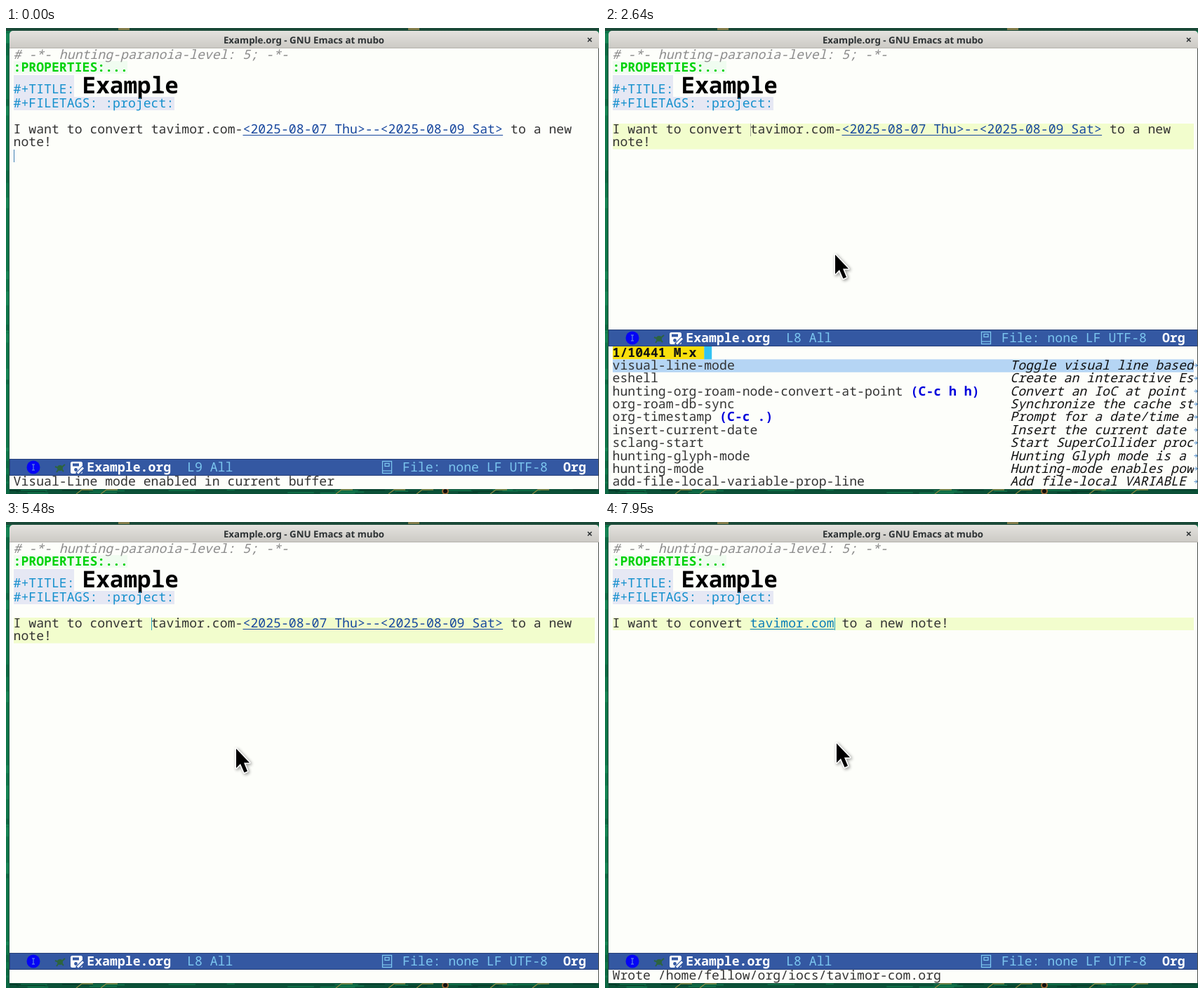
An HTML page with a canvas that plays this animation: 845x663 px, repeating every 7990 ms.

```html
<!DOCTYPE html>
<html lang="en">
<head>
<meta charset="utf-8">
<title>Editor session</title>
<style>
html, body { margin: 0; width: 100%; height: 100%; overflow: hidden; background: #0f6c45; }
canvas { display: block; }
</style>
</head>
<body>
<canvas id="stage" width="845" height="663"></canvas>
<script>
const ctx = document.getElementById('stage').getContext('2d');
const LOOP = 7990, W = 845, H = 663;
const COL = 10.9, ROW = 18.37, LEFT = 10.5, EDGE = 839;
const MONO = '"Noto Sans Mono", "DejaVu Sans Mono", monospace';
const PAPER = '#fdfefa', INK = '#333333', SKY = '#7cc6ef';
const DOMAIN = 'tavimor.com';

const commands = [
  ['visual-line-mode', '', 'Toggle visual line based'],
  ['eshell', '', 'Create an interactive Es'],
  ['hunting-org-roam-node-convert-at-point', '(C-c h h)', 'Convert an IoC at point'],
  ['org-roam-db-sync', '', 'Synchronize the cache st'],
  ['org-timestamp', '(C-c .)', 'Prompt for a date/time a'],
  ['insert-current-date', '', 'Insert the current date'],
  ['sclang-start', '', 'Start SuperCollider proc'],
  ['hunting-glyph-mode', '', 'Hunting Glyph mode is a'],
  ['hunting-mode', '', 'Hunting-mode enables pow'],
  ['add-file-local-variable-prop-line', '', 'Add file-local VARIABLE']
];

// Pointer keys: time, x, y
const path = [
  [460, 560, 668], [1250, 224, 190], [1390, 211, 158], [1530, 209, 148],
  [1650, 209, 148], [2050, 328, 322.5], [7660, 328, 322.5], [7950, 330, 315]
];

const colX = n => LEFT + n * COL;

function rect(x, y, w, h, color) {
  ctx.fillStyle = color;
  ctx.fillRect(x, y, w, h);
}

function text(str, x, y, color = INK, style = '', size = 18.17) {
  ctx.font = `${style} ${size}px ${MONO}`;
  ctx.fillStyle = color;
  ctx.fillText(str, x, y);
}

function line(points, color, width = 1) {
  ctx.strokeStyle = color;
  ctx.lineWidth = width;
  ctx.beginPath();
  points.forEach(([x, y]) => ctx.lineTo(x, y));
  ctx.stroke();
}

function disc(x, y, r, color) {
  ctx.fillStyle = color;
  ctx.beginPath();
  ctx.arc(x, y, r, 0, Math.PI * 2);
  ctx.fill();
}

function seeded(seed) {
  return () => (seed = (seed * 16807) % 2147483647) / 2147483647;
}

function drawDesktop() {
  rect(0, 0, W, H, '#0e7549');
  rect(0, 0, W, 4, '#1b4a38');
  rect(0, 656, W, 7, '#0b5037');
  const rnd = seeded(77);
  for (let i = 0; i < 26; i++) {
    const x = rnd() * W, len = 10 + rnd() * 40;
    rect(x, 656 + rnd() * 5, len, 1.5, i % 3 ? '#12764c' : '#073c2a');
    rect(0, rnd() * H, 5, 4 + rnd() * 14, i % 2 ? '#0b6742' : '#158353');
  }
  for (const x of [100, 135, 470, 545, 585, 690, 750]) {
    line([[x, 663], [x + 8, 657], [x + 24, 657]], '#8b8a45', 1.3);
  }
  for (const x of [160, 573]) rect(x, 0, 16, 3, '#857f4e');
  disc(626, 659, 5, '#9a6a35');
  disc(626, 659, 3, '#111');
}

function drawTitle(name) {
  const shade = ctx.createLinearGradient(0, 4, 0, 29);
  shade.addColorStop(0, '#e4e2de');
  shade.addColorStop(1, '#cbc9c4');
  ctx.fillStyle = shade;
  ctx.beginPath();
  ctx.roundRect(5, 4, 840, 25, [5, 5, 0, 0]);
  ctx.fill();
  rect(5, 28, 840, 1, '#b4b2ad');
  ctx.font = '600 13.3px "Noto Sans", "Open Sans", sans-serif';
  ctx.fillStyle = '#2d3234';
  ctx.textAlign = 'center';
  ctx.fillText(name + ' - GNU Emacs at mubo', 424.5, 21.5);
  ctx.textAlign = 'left';
  line([[829, 14], [834.5, 19.5]], '#2d3234', 1.6);
  line([[834.5, 14], [829, 19.5]], '#2d3234', 1.6);
}

function drawHeader() {
  rect(11, 47, 162, 18, '#f0fcf0');
  rect(11, 67, 86, 31, '#e6e8f4');
  rect(11, 98, 229, 19, '#e6e8f4');
  text('# -*- hunting-paranoia-level: 5; -*-', LEFT, 43.5, '#8c8c8c', 'italic');
  text(':PROPERTIES:...', LEFT, 62, '#00d20a', 'bold');
  text('#+TITLE:', LEFT, 92.5, '#1590cd');
  text('Example', colX(9), 93, '#000', 'bold', 32.7);
  text('#+FILETAGS: :project:', LEFT, 113, '#1590cd');
}

function linked(str, col, color) {
  text(str, colX(col), 150, color);
  rect(colX(col), 152, str.length * COL, 1, color);
}

function drawBody(mode, marked) {
  if (marked) rect(11, 136, 828, mode === 'dated' ? 36.5 : 18, '#f2fdcd');
  text('I want to convert', LEFT, 150);
  if (mode === 'dated') {
    text(DOMAIN + '-', colX(18), 150);
    linked('<2025-08-07 Thu>--<2025-08-09 Sat>', 30, '#17479e');
    text('to a new', colX(65), 150);
    text('note!', LEFT, 168.4);
  } else if (mode === 'gap') {
    text('to a new note!', colX(19), 150);
  } else {
    linked(DOMAIN, 18, '#0a7cb8');
    text('to a new note!', colX(30), 150);
  }
}

function drawModeline(y, row) {
  rect(5, y, 840, 24, '#3458a2');
  ctx.strokeStyle = '#263f78';
  ctx.lineWidth = 1;
  ctx.strokeRect(5.5, y + .5, 839, 23);
  const base = y + 18, mid = y + 12;

  disc(39, mid, 9.5, '#0505f5');
  line([[37, mid - 4], [41, mid - 4]], '#6f9ce0');
  line([[39, mid - 4], [39, mid + 4]], '#6f9ce0');
  line([[37, mid + 4], [41, mid + 4]], '#6f9ce0');

  disc(77, mid + 1, 4, '#2d6440');
  line([[70, mid - 1], [77, mid + 2], [84, mid - 4]], '#2d6440', 2);
  line([[72, mid + 7], [77, mid], [82, mid + 6]], '#2d6440', 2);

  // Disk with pencil
  ctx.fillStyle = '#fff';
  ctx.beginPath();
  ctx.roundRect(92, y + 4, 17, 17, 2.5);
  ctx.fill();
  rect(95, y + 6.5, 9, 4, '#3458a2');
  disc(99.5, y + 15.5, 2.4, '#3458a2');
  line([[101, y + 22], [111, y + 12]], '#3458a2', 6);
  line([[102, y + 20.5], [110, y + 12.5]], '#fff', 3);

  // Notebook
  ctx.strokeStyle = SKY;
  ctx.lineWidth = 1.3;
  ctx.strokeRect(536.5, y + 3.5, 13, 17);
  ctx.strokeRect(540, y + 6.5, 6, 4);
  line([[537, y + 17], [549, y + 17]], SKY, 1.2);

  text('Example.org', 115.3, base, '#fff', 'bold');
  text(`L${row} All`, 258, base, SKY);
  text('File: none LF UTF-8', 565, base, SKY);
  text('Org', 793.9, base, '#fff', 'bold');
}

function drawPicker(pick, cursorCol) {
  rect(11, 453, 130.5, 18.4, '#f9df0c');
  rect(11, 471.4 + pick * ROW, 828, ROW, '#b5d5f4');
  text(pick + 1 + '/10441 M-x', LEFT, 467.5, '#111', 'bold');
  if (cursorCol >= 0) {
    rect(colX(cursorCol), 453, COL, 18.4, '#34c3f1');
    if (cursorCol === 0) text(pick + 1, LEFT, 467.5, '#e8e36a', 'bold');
  }
  commands.forEach(([name, keys, note], i) => {
    const y = 486 + i * ROW;
    text(name, LEFT, y);
    text(keys, colX(name.length + 1), y, '#0000dc', 'bold');
    ctx.save();
    ctx.beginPath();
    ctx.rect(5, y - 16, EDGE - 5, 22);
    ctx.clip();
    text(note, colX(52), y, '#111', 'italic');
    ctx.restore();
    line([[839.5, y - 6], [844, y - 6]], '#3b7fc4');
    line([[841.5, y - 8.5], [844, y - 6], [841.5, y - 3.5]], '#3b7fc4');
  });
}

function drawPointer(t) {
  if (t < path[0][0]) return;
  let [, x, y] = path[path.length - 1];
  for (let i = 1; i < path.length; i++) {
    const [t0, x0, y0] = path[i - 1], [t1, x1, y1] = path[i];
    if (t < t1) {
      let k = (t - t0) / (t1 - t0);
      k = k * k * (3 - 2 * k);
      x = x0 + (x1 - x0) * k;
      y = y0 + (y1 - y0) * k;
      break;
    }
  }
  ctx.save();
  ctx.translate(x, y);
  const arrow = new Path2D('M0 0V27.5L6 21.5L11.5 34L16 32L11 20H19Z');
  ctx.lineJoin = 'round';
  ctx.shadowColor = 'rgba(0,0,0,.45)';
  ctx.shadowBlur = 4;
  ctx.shadowOffsetX = ctx.shadowOffsetY = 1.5;
  ctx.strokeStyle = '#fff';
  ctx.lineWidth = 3.2;
  ctx.stroke(arrow);
  ctx.shadowColor = 'transparent';
  ctx.fillStyle = '#000';
  ctx.fill(arrow);
  ctx.restore();
}

function echoAt(t) {
  if (t < 1550) return 'Visual-Line mode enabled in current buffer';
  if (t >= 5810 && t < 6530) return 'Waiting for reply from selection owner...';
  if (t >= 6830) return `Wrote /home/fellow/org/iocs/${DOMAIN.replace('.', '-')}.org`;
  return '';
}

function draw(t) {
  const clicked = t >= 1550;
  const picking = t >= 2640 && t < 5350;
  const mode = t < 6500 ? 'dated' : t < 6530 ? 'gap' : 'linked';
  const barY = picking ? 429 : t >= 5810 && t < 6530 ? 595 : 613;

  drawDesktop();
  rect(5, 29, 840, 627, PAPER);
  drawTitle(t >= 3170 && t < 5350 ? '*Minibuf-1*' : 'Example.org');
  drawHeader();
  drawBody(mode, clicked);
  if (!clicked) rect(11, 173, 1, 18, '#3f7fb5');
  else rect(mode === 'linked' ? 327 : 207, 136, 1, 18, picking ? '#a9ad98' : '#25a5c8');

  drawModeline(barY, clicked ? 8 : 9);
  if (picking) {
    const pick = t < 3780 ? 0 : t < 4030 ? 1 : 2;
    const dark = (t >= 3170 && t < 3700) || (t >= 4520 && t < 5020);
    drawPicker(pick, dark ? -1 : t >= 5310 ? 0 : 12);
  } else {
    text(echoAt(t), LEFT, barY + 38);
  }
  rect(4, 29, 1, 627, '#23503e');
  rect(844, 29, 1, 627, '#4a4f4b');
  drawPointer(t);
}

ctx.textRendering = 'geometricPrecision';
const start = performance.now();
function tick() {
  draw((performance.now() - start) % LOOP);
  requestAnimationFrame(tick);
}
tick();
</script>
</body>
</html>
```
